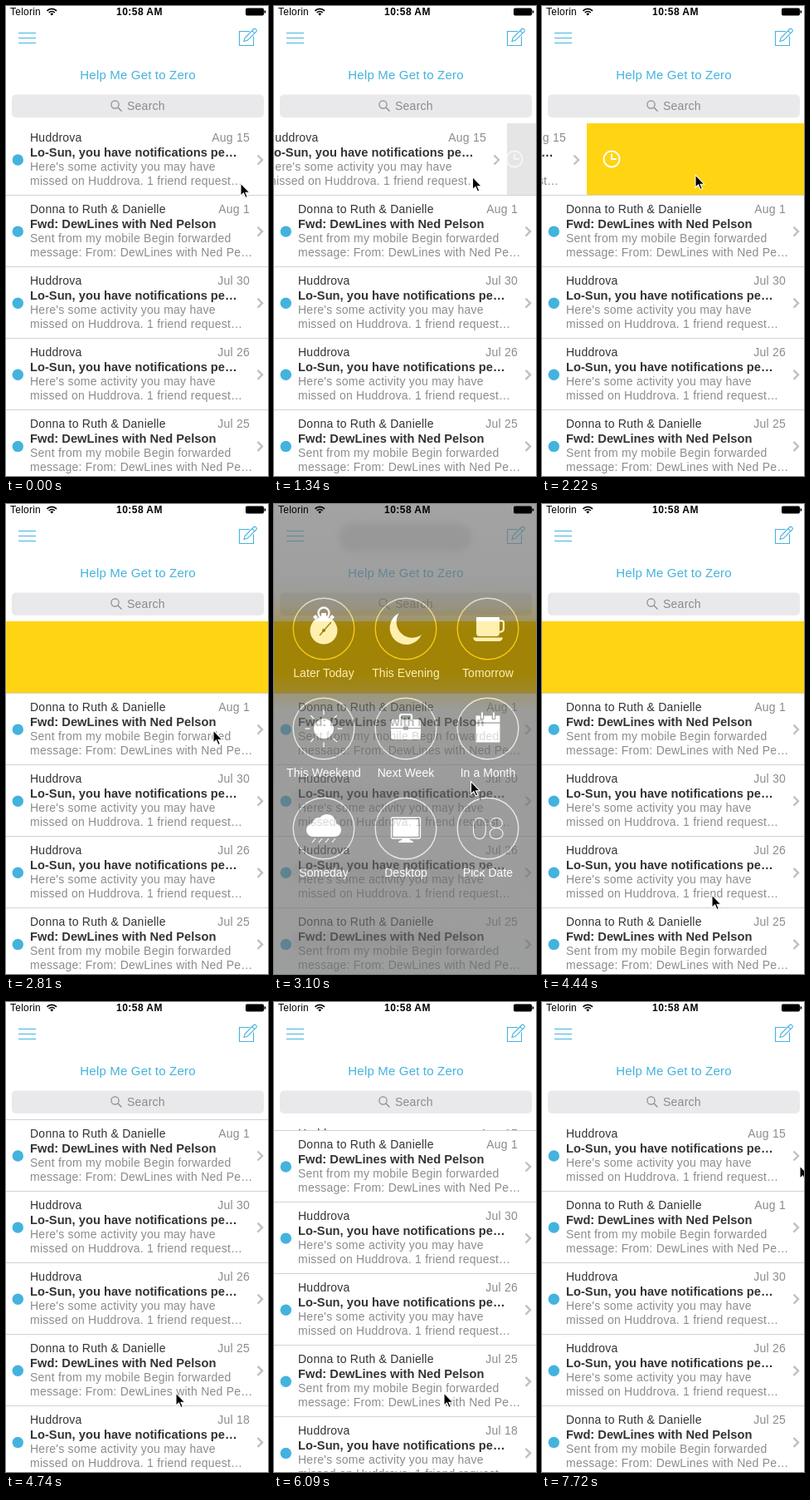
An HTML page for the animation above (8 s loop, 316 by 565 pixels).

```html
<!DOCTYPE html>
<html lang="en">
<head>
<meta charset="utf-8">
<title>Snooze a message</title>
<style>
  html, body { margin: 0; width: 100%; height: 100%; overflow: hidden; background: #fff; }
  svg { display: block; width: 100vw; height: 100vh; }
  text { font: 14px "Liberation Sans", Arial, sans-serif; letter-spacing: .24px; }
  .status { font-size: 12px; }
  .bold { font-weight: bold; letter-spacing: .45px; }
  .title { font-size: 15px; letter-spacing: .18px; fill: #43b3de; }
  .sender { fill: #333; }
  .subject { font-size: 14.7px; font-weight: bold; letter-spacing: 0; fill: #333; }
  .soft { fill: #8c8c8c; }
  .end { text-anchor: end; }
  .mid { text-anchor: middle; }
  .label { text-anchor: middle; letter-spacing: .05px; fill: #fff; }
  .digits { font: 100 37px Roboto, Inter, sans-serif; letter-spacing: 0; text-anchor: middle; fill: #fff; }
  .line { shape-rendering: crispEdges; }
</style>
</head>
<body>
<svg viewBox="0 0 316 565" preserveAspectRatio="none">
  <defs>
    <clipPath id="listClip"><rect y="141" width="316" height="424"/></clipPath>
    <linearGradient id="shade" gradientUnits="userSpaceOnUse" x1="0" y1="0" x2="0" y2="565">
      <stop offset="0" stop-color="#767676"/>
      <stop offset=".17" stop-color="#6f6f6f"/>
      <stop offset=".21" stop-color="#6f6a58"/>
      <stop offset=".265" stop-color="#735c00"/>
      <stop offset=".36" stop-color="#735c00"/>
      <stop offset=".4" stop-color="#6e6233"/>
      <stop offset=".44" stop-color="#6c6c6a"/>
      <stop offset="1" stop-color="#6c6d6d"/>
    </linearGradient>
    <linearGradient id="ring" gradientUnits="userSpaceOnUse" x1="0" y1="113" x2="0" y2="273">
      <stop offset="0" stop-color="#ddd9c8"/>
      <stop offset=".2" stop-color="#f2c616"/>
      <stop offset=".62" stop-color="#f2c616"/>
      <stop offset=".8" stop-color="#dedbd0"/>
      <stop offset="1" stop-color="#ddd"/>
    </linearGradient>
    <filter id="blur" x="-20%" y="-60%" width="140%" height="220%"><feGaussianBlur stdDeviation="3"/></filter>
  </defs>

  <rect width="316" height="565" fill="#fff"/>

  <g id="list" clip-path="url(#listClip)">
    <g id="panel">
      <rect id="panelFill" y="141" width="316" height="86"/>
      <g id="clock" fill="none" stroke="#fff" stroke-width="2" stroke-linecap="round">
        <circle r="9.5"/><path d="M0-5.5V0H5"/>
      </g>
    </g>
  </g>

  <g fill="none" stroke="#43b3de" stroke-width="1.1">
    <path d="M15 32.5H36M15 38.5H36M15 44.5H36"/>
    <path d="M294 30.5H281.500V47.500H298.500V36.500"/>
    <path d="M287 42.500L288.200 38.300L299 27.500Q300 26.700 301 27.600L302 28.600Q302.800 29.600 302 30.600L291.200 41.300ZM296.800 29.700L299.900 32.800"/>
  </g>
  <text class="title mid" x="159" y="88">Help Me Get to Zero</text>
  <rect x="7" y="106.500" width="304" height="27.500" rx="5" fill="#e9e9eb"/>
  <g fill="none" stroke="#8a8a8f" stroke-width="1.2">
    <circle cx="131.500" cy="118.500" r="4.600"/><path d="M135 122L139.500 126.500"/>
  </g>
  <text x="146" y="125" fill="#8a8a8f">Search</text>

  <g id="menu">
    <rect width="316" height="565" fill="url(#shade)"/>
    <g fill="#646464" filter="url(#blur)" opacity=".8">
      <rect x="78" y="23" width="160" height="35" rx="17"/>
      <rect x="20" y="342" width="225" height="24" rx="12"/>
      <rect x="20" y="430" width="205" height="22" rx="11"/>
      <rect x="20" y="514" width="225" height="24" rx="12"/>
    </g>
    <g id="buttons"></g>
  </g>

  <g>
    <text class="status" x="5" y="11">Telorin</text>
    <g fill="none" stroke="#000" stroke-width="1.700">
      <path d="M49.500 5.800A8 8 0 0 1 61 5.800M51.700 8A5 5 0 0 1 58.800 8"/>
    </g>
    <path d="M53.300 9.500A2.800 2.800 0 0 1 57.200 9.500L55.250 11.600Z"/>
    <text class="status bold mid" x="161" y="11">10:58 AM</text>
    <rect x="289" y="2.500" width="22" height="9" rx="1.800"/>
    <path d="M311.500 5Q313.500 5.500 313.500 7T311.500 9Z"/>
  </g>

  <path id="cursor" d="M0 0V15.200L3.500 12L6 17.400L8.400 16.400L6 11.200H10.800Z" stroke="#fff" stroke-width="1.100"/>
</svg>

<script>
const LOOP = 8000, BEAT = 148.3;   // the screen refreshes once per beat
const PITCH = 86.1, TOP = 141;
const $ = id => document.getElementById(id);

const ping = {
  sender: "Huddrova", subject: "Lo-Sun, you have notifications pe…",
  body: ["Here's some activity you may have", "missed on Huddrova. 1 friend request…"]
};
const forward = {
  sender: "Donna to Ruth & Danielle", subject: "Fwd: DewLines with Ned Pelson",
  body: ["Sent from my mobile Begin forwarded", "message: From: DewLines with Ned Pe…"]
};
const mails = [
  [ping, "Aug 15"], [forward, "Aug 1"], [ping, "Jul 30"],
  [ping, "Jul 26"], [forward, "Jul 25"], [ping, "Jul 18"]
];

function rowMarkup([mail, date], i) {
  const esc = s => s.replace("&", "&amp;");
  return `<g class="row">
    <rect width="319" height="${i ? 87 : 86}" fill="#fff"/>
    ${i ? '<rect class="line" width="316" height="1" fill="#d2d2d2"/>' : ""}
    <circle cx="14.300" cy="44" r="6.700" fill="#43b3de"/>
    <text class="sender" x="29" y="22">${esc(mail.sender)}</text>
    <text class="soft end" x="294" y="22">${date}</text>
    <text class="subject" x="29" y="39.500">${mail.subject}</text>
    <text class="soft" x="29" y="56.500">${mail.body[0]}</text>
    <text class="soft" x="29" y="73.500">${mail.body[1]}</text>
    <path d="M303.500 38.500L309 44L303.500 49.500" fill="none" stroke="#c0c0c3" stroke-width="2.400"/>
  </g>`;
}
$("list").insertAdjacentHTML("beforeend", mails.map(rowMarkup).join(""));
const rows = [...document.querySelectorAll(".row")];

// Icons are drawn around the centre of their button.
const dark = "#6c6c6c", olive = "#6b5600";
const rays = Array.from({ length: 8 }, (_, k) =>
  `<path d="M0-16.500V-22.500" transform="rotate(${k * 45})" stroke="#fff" stroke-width="1.300"/>`).join("");
const options = [
  ["Later Today", `<circle cy="2" r="16.500"/><circle cy="-19" r="6.500" fill="none" stroke="#fff" stroke-width="2.500"/>
    <path d="M-3-19H3V-13H-3ZM-13-14L-10-17L-7-14L-10-11ZM13-14L10-17L7-14L10-11Z"/>
    <path d="M-5 8L9-8" stroke="${olive}" stroke-width="1.400"/><circle cy="2" r="2" fill="${olive}"/>`],
  ["This Evening", `<path d="M-8-19A20 20 0 1 0 19 7A19 19 0 0 1-8-19Z"/>`],
  ["Tomorrow", `<path d="M-14-14H14V5Q14 9 10 9H-10Q-14 9-14 5ZM-18 10.500H18Q17 15 13 15H-13Q-17 15-18 10.500Z"/>
    <path d="M14-9.500H17Q19-9.500 19-7V0Q19 3.500 14 4" fill="none" stroke="#fff" stroke-width="2.200"/>`],
  ["This Weekend", `<circle r="12"/>${rays}`],
  ["Next Week", `<rect x="-18" y="-11" width="36" height="24" rx="2.500"/>
    <path d="M-7-11V-15Q-7-17-5-17H5Q7-17 7-15V-11" fill="none" stroke="#fff" stroke-width="2.200"/>
    <path d="M-18-.5H18" stroke="${dark}"/><rect x="-3" y="-2.500" width="6" height="4" fill="${dark}"/>`],
  ["In a Month", `<path d="M-14.500-15.500H14.500V-7.500H-14.500ZM-14.500-6.300H14.500V16.500H-14.500Z"/>
    <path d="M-7-20V-11M7-20V-11" stroke="${dark}" stroke-width="4.500"/>
    <path d="M-7-19.500V-12M7-19.500V-12" stroke="#fff" stroke-width="2.200"/>`],
  ["Someday", `<circle cx="-13" cy="2" r="8"/><circle cx="-6" cy="-5" r="8"/><circle cx="4" cy="-6" r="11"/>
    <circle cx="13" cy="2" r="8"/><rect x="-13" y="-2" width="26" height="12"/>
    <path d="M-10 12L-14 17M-2 12L-6 17M6 12L2 17M14 12L10 17" stroke="#fff" stroke-width="1.200"/>`],
  ["Desktop", `<rect x="-17.500" y="-13" width="35" height="25" rx="1.500" fill="none" stroke="#fff" stroke-width="1.300"/>
    <path d="M-15.500-11H15.500V10H-15.500ZM-4 12H4L5 14Q9 14.500 9 17H-9Q-9 14.500-5 14Z"/>`],
  ["Pick Date", `<text class="digits" y="13">08</text>`]
];
$("buttons").innerHTML = options.map(([label, icon], i) => {
  const x = 60 + i % 3 * 99, y = 150 + Math.floor(i / 3) * 120;
  return `<circle cx="${x}" cy="${y}" r="36.800" fill="none" stroke="url(#ring)" stroke-width="1.400"/>
    <g transform="translate(${x} ${y})" fill="#fff">${icon}</g>
    <text class="label" x="${x}" y="${y + 58}">${label}</text>`;
}).join("");

// Keys are [beat, value]; values run straight between them.
function track(keys, n) {
  const i = keys.findIndex(k => k[0] > n);
  if (i === 0) return keys[0][1];
  if (i < 0) return keys[keys.length - 1][1];
  const [a, from] = keys[i - 1], [b, to] = keys[i];
  return from + (to - from) * (n - a) / (b - a);
}

const cursorX = [[0, 283], [5, 264], [9, 239.5], [12, 195], [13, 185], [16, 185], [17, 200], [19, 250],
  [23, 225], [25, 225], [28, 205], [44, 205], [45, 222], [46, 258], [47, 296], [48, 322], [51, 322], [52, 311]];
const cursorY = [[0, 213], [5, 208], [9, 205.5], [13, 203], [16, 203], [17, 217], [19, 272],
  [23, 395], [25, 395], [28, 470], [44, 470], [45, 430], [46, 345], [47, 250], [48, 200], [52, 197]];
const fling = [[13, 93], [14, 170], [15, 265], [16, 320], [40, 320], [41, 0]];
const gap = [[30, 0], [31, 50], [32, PITCH], [40, PITCH], [41, PITCH - 13], [42, 24], [43, 0]];
const menuFade = [[19, 0], [22, 1], [28, 1], [30, 0]];

function draw(t) {
  const n = Math.floor((t + 15) / BEAT);
  const x = track(cursorX, n), y = track(cursorY, n);
  const drag = n < 13 ? Math.max(0, 277.5 - x) : track(fling, n);
  const closed = track(gap, n);

  rows.forEach((row, i) => row.setAttribute("transform",
    i ? `translate(0 ${TOP + PITCH * i - closed})` : `translate(${-drag} ${TOP})`));

  const edge = 319 - drag;
  $("panelFill").setAttribute("fill", drag > 60 ? "#ffd412" : "#e5e5e5");
  $("clock").setAttribute("transform", `translate(${Math.min(290, edge + 30)} 184)`);
  $("clock").setAttribute("opacity", n >= 16 ? 0 : Math.min(1, drag / 60));

  const fade = track(menuFade, n);
  $("menu").setAttribute("opacity", fade);
  $("menu").setAttribute("visibility", fade ? "visible" : "hidden");
  $("cursor").setAttribute("transform", `translate(${x} ${y})`);
}

const start = performance.now();
function tick() {
  draw((performance.now() - start) % LOOP);
  requestAnimationFrame(tick);
}
tick();
</script>
</body>
</html>
```
